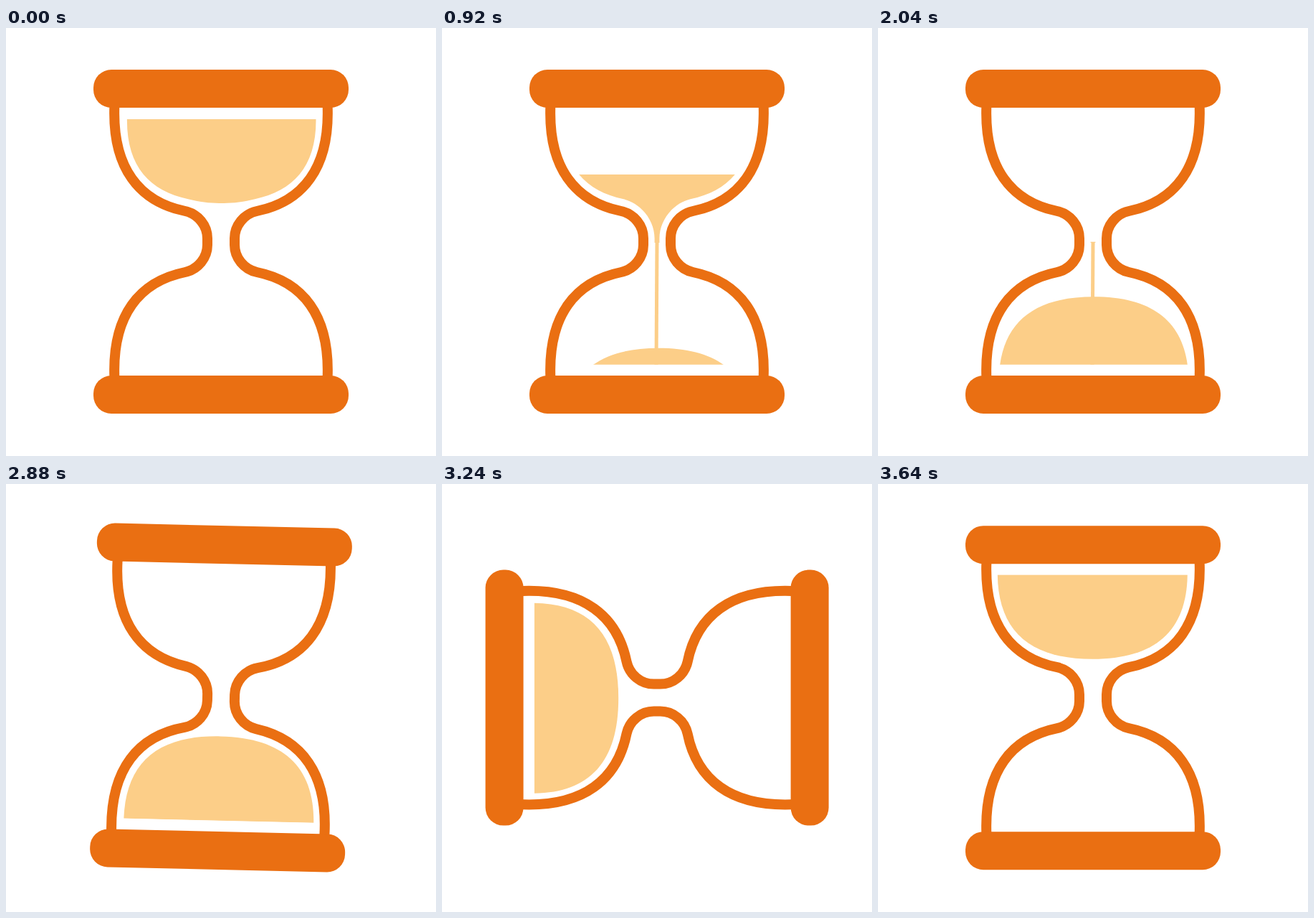
An HTML page that plays this animation: 600 by 596 pixels, repeating every 3.96 s.

```html
<!DOCTYPE html>
<html lang="en">
<head>
<meta charset="utf-8">
<title>Hourglass</title>
<style>
  html, body { margin: 0; width: 100%; height: 100%; overflow: hidden; background: #fff; }
  svg { display: block; width: 100%; height: 100%; }
  .bar { fill: #ea6f12; }
  .glass { fill: none; stroke: #ea6f12; stroke-width: 14; }
  .sand { fill: #fcce88; }
  .stream { stroke: #fcce88; stroke-width: 5; }
</style>
</head>
<body>
<svg viewBox="0 0 600 596">
  <defs>
    <clipPath id="below"><rect id="level" width="600" height="300"/></clipPath>
    <clipPath id="floor"><rect width="600" height="468.7"/></clipPath>
    <path id="side" d="M151.3 110 C148.5 195 186 242 250 255 C268 259 281 275 281 293 V302
      C281 320 268 336 250 340 C186 353 148.5 400 151.3 485"/>
  </defs>
  <g id="hourglass">
    <g clip-path="url(#below)"><path id="top" class="sand"/></g>
    <line id="stream" class="stream"/>
    <g clip-path="url(#floor)">
      <path id="pile" class="sand" d="M-132.5 117.5 C-131.5 39.5 -88 0 0 0 S131.5 39.5 132.5 117.5 Z"/>
    </g>
    <use href="#side" class="glass"/>
    <use href="#side" class="glass" transform="matrix(-1 0 0 1 600 0)"/>
    <rect class="bar" x="122" y="58" width="356" height="53" rx="25"/>
    <rect class="bar" x="122" y="484" width="356" height="53" rx="25"/>
  </g>
</svg>
<script>
const LOOP = 3960, STEP = 40;
const FUNNEL = 200, LAND = 560, DRY = 2040, DONE = 2400, TURN = 2840, TURNED = 3640;
const NECK = 298, FLOOR = 468.7;

const $ = id => document.getElementById(id);
const set = (id, attrs) => {
  for (const key in attrs) $(id).setAttribute(key, attrs[key]);
};
const part = (t, from, to) => Math.min(1, Math.max(0, (t - from) / (to - from)));
const mix = (a, b, k) => a + (b - a) * k;

// The bowl's rounded underside stretches into a spout as k goes from 0 to 1.
function topSand(k) {
  const c1 = [mix(268, 277, k), mix(242, 244, k)];
  const c2 = [mix(284, 296.5, k), mix(244, 267, k)];
  const end = [296.6, mix(244, 293, k)];
  const tip = mix(244, 299, k);
  const flip = ([x, y]) => [600 - x, y];
  return `M168.2 127 C167.5 193 200 227 253.4 238.3 C${c1} ${c2} ${end} V${tip} H303.4
    V${end[1]} C${flip(c2)} ${flip(c1)} 346.6 238.3 C400 227 432.5 193 431.8 127 Z`;
}

function draw(t) {
  const spout = part(t, 0, FUNNEL);
  const grow = part(t, LAND, DONE);
  const turn = part(t, TURN, TURNED);

  set('level', { y: 127 + 0.0837 * t });
  set('top', {
    d: topSand(spout),
    transform: `translate(${0.7 * (1 - spout)} 0)`,
    visibility: t > DRY + STEP ? 'hidden' : 'visible'
  });

  const head = mix(NECK, FLOOR, part(t, FUNNEL, LAND));
  const tail = mix(NECK, 354, part(t, DRY, DONE));
  const lean = y => 300 - (y - NECK) / 171;
  set('stream', {
    x1: lean(tail), y1: tail, x2: lean(head), y2: head,
    visibility: t > FUNNEL && t < DONE ? 'visible' : 'hidden'
  });

  set('pile', { transform: `translate(${mix(302.2, 300.7, grow)} ${mix(FLOOR, 351.4, grow)})` });
  set('hourglass', { transform: `rotate(${180 * turn * turn * (3 - 2 * turn)} 300 297.6)` });
}

function tick() {
  const t = performance.now() % LOOP;
  draw(Math.floor(t / STEP) * STEP);
  requestAnimationFrame(tick);
}
tick();
</script>
</body>
</html>
```
